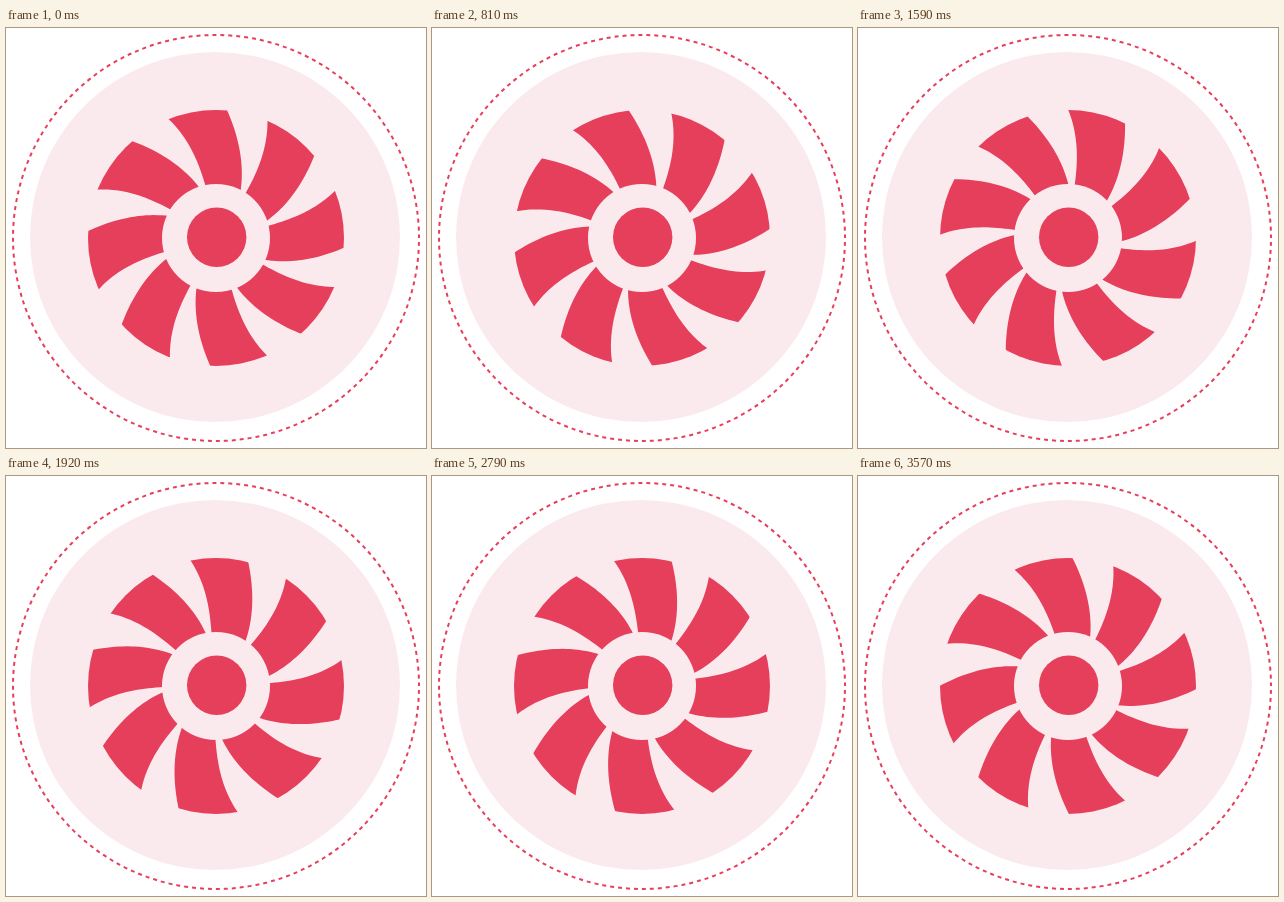
Write an HTML page with a canvas that moves like this. It is 420x420 px and loops after 3.6 s.

```html
<!DOCTYPE html>
<html lang="en">
<head>
<meta charset="utf-8">
<title>Spinning fan</title>
<style>
  html, body { margin: 0; width: 100%; height: 100%; overflow: hidden; background: #fff; }
  canvas { display: block; width: 420px; height: 420px; }
</style>
</head>
<body>
<canvas id="stage"></canvas>
<script>
const LOOP = 3600, STEP = 30, SIZE = 420, CENTER = 210;
const RED = '#e63f5b', PINK = '#fbeaed';
const HUB = 54, RIM = 128, BLADES = 8;
const RING = 203, DASHES = 160;
const RAD = Math.PI / 180, TAU = Math.PI * 2;

const canvas = document.getElementById('stage');
const ratio = window.devicePixelRatio || 1;
canvas.width = canvas.height = SIZE * ratio;
const ctx = canvas.getContext('2d');
ctx.scale(ratio, ratio);

function disc(x, y, r, color) {
  ctx.beginPath();
  ctx.arc(x, y, r, 0, TAU);
  ctx.fillStyle = color;
  ctx.fill();
}

// Blade edges: degrees clockwise from the top, u runs from hub (0) to rim (1).
const trailing = u => -14.2 - 2.46 * u - 5.94 * u * u;
const leading = u => 24.2 - 23.4 * u + 3 * u * u;

function edgePoint(edge, u) {
  const r = HUB + (RIM - HUB) * u;
  const a = edge(u) * RAD;
  ctx.lineTo(r * Math.sin(a), -r * Math.cos(a));
}

function bladePath() {
  const n = 24, from = -0.1, span = 1.2;
  for (let i = 0; i <= n; i++) edgePoint(trailing, from + span * i / n);
  // Bow the outer end past the rim so the clip circle shapes it.
  ctx.lineTo(-28, -150);
  for (let i = n; i >= 0; i--) edgePoint(leading, from + span * i / n);
  ctx.closePath();
}

function drawFan(angle) {
  ctx.save();
  ctx.translate(CENTER, CENTER);
  ctx.beginPath();
  ctx.arc(0, 0, RIM, 0, TAU);
  ctx.clip();
  ctx.rotate(angle);
  // The blades sit slightly off the axis; rim and hub stay concentric.
  ctx.translate(2.7, 0.2);
  ctx.fillStyle = RED;
  for (let i = 0; i < BLADES; i++) {
    ctx.beginPath();
    bladePath();
    ctx.fill();
    ctx.rotate(TAU / BLADES);
  }
  ctx.restore();
}

function drawRing() {
  const dash = TAU * RING / DASHES / 2;
  ctx.beginPath();
  ctx.arc(CENTER, CENTER, RING, 0, TAU);
  ctx.setLineDash([dash, dash]);
  ctx.lineDashOffset = dash;
  ctx.lineWidth = 2;
  ctx.strokeStyle = RED;
  ctx.stroke();
  ctx.setLineDash([]);
}

function draw(time) {
  ctx.fillStyle = '#fff';
  ctx.fillRect(0, 0, SIZE, SIZE);
  drawRing();
  disc(209, 209, 185, PINK);
  drawFan(time / LOOP * TAU);
  disc(CENTER, CENTER, HUB, PINK);
  disc(210.7, 209.2, 29.7, RED);
}

function tick() {
  const time = performance.now() % LOOP;
  draw(Math.floor(time / STEP) * STEP);
  requestAnimationFrame(tick);
}
tick();
</script>
</body>
</html>
```
